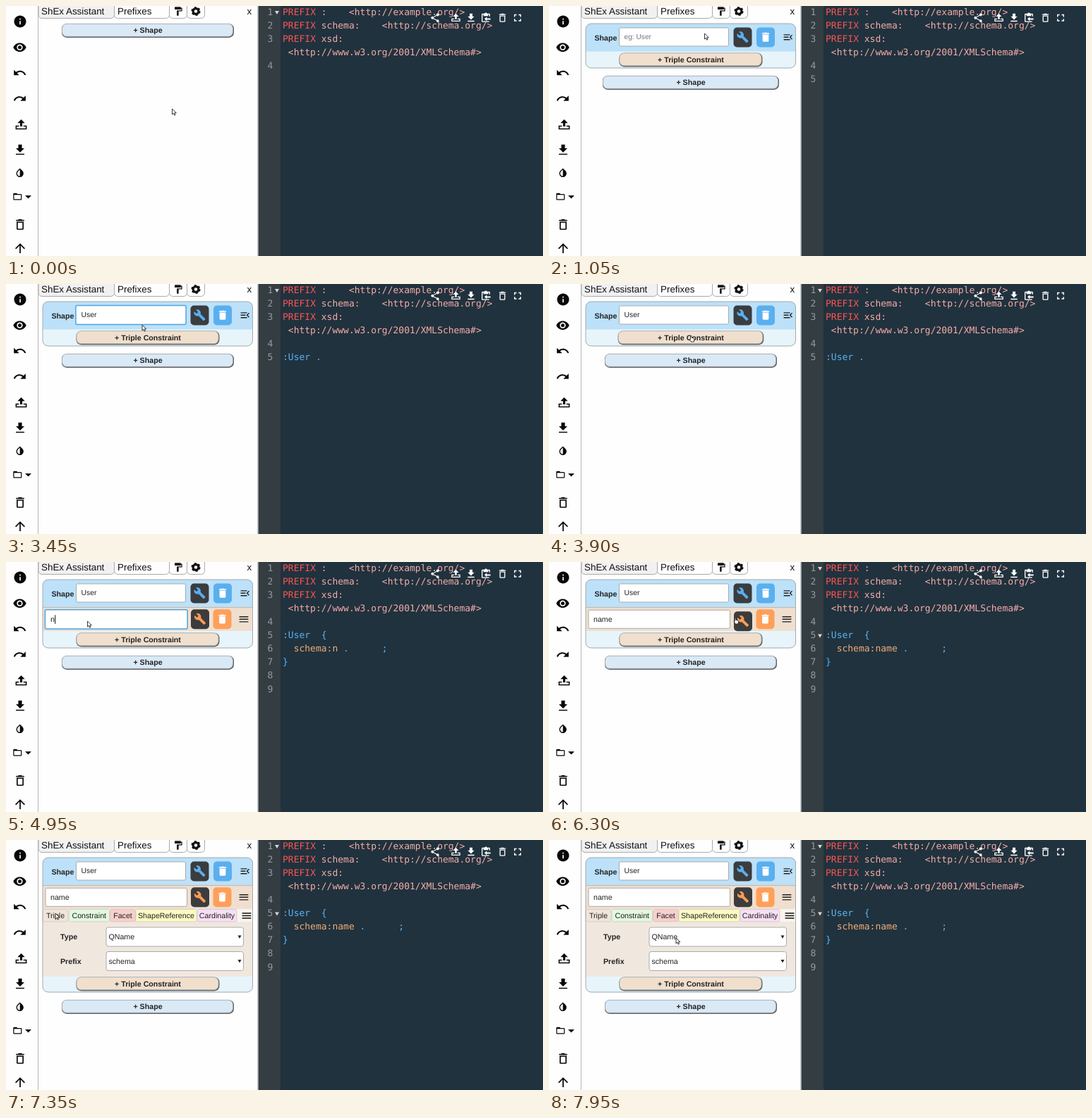
These frames come from a looping animation (761 px wide and 355 px high, 8000 ms). An HTML page:

```html
<!DOCTYPE html>
<html lang="en">
<head>
<meta charset="utf-8">
<title>Shape assistant</title>
<style>
  html, body { margin: 0; width: 100%; height: 100%; overflow: hidden; background: #fefefe; }
  svg { display: block; width: 761px; height: 355px; }
  text { font: 10.67px "Liberation Sans", Arial, sans-serif; fill: #222; text-rendering: geometricPrecision; }
  .b { font-weight: bold; }
  .tab { font-size: 13.4px; fill: #111; }
  .code { font: 13px "DejaVu Sans Mono", monospace; white-space: pre; }
</style>
</head>
<body>
<svg viewBox="0 0 761 355"><g id="back"></g><g id="live"></g></svg>
<script>
const LOOP = 8000, STEP = 150;
const COL = 7.826, ROW = 19.08, BASE = 12.8;
const RED = '#fb5450', PINK = '#f5aca6', BLUE = '#5cb3f0', TAN = '#f0ac78';

const ICONS = {
  info: 'M12 2C6.48 2 2 6.48 2 12s4.48 10 10 10 10-4.48 10-10S17.52 2 12 2zm1 15h-2v-6h2v6zm0-8h-2V7h2v2z',
  eye: 'M12 4.5C7 4.5 2.73 7.6 1 12c1.73 4.4 6 7.5 11 7.5s9.27-3.1 11-7.5c-1.73-4.4-6-7.5-11-7.5zM12 17a5 5 0 1 1 0-10 5 5 0 0 1 0 10zm0-8a3 3 0 1 0 0 6 3 3 0 0 0 0-6z',
  undo: 'M12.5 8c-2.65 0-5.05 1-6.9 2.6L2 7v9h9l-3.62-3.62c1.39-1.16 3.16-1.88 5.12-1.88 3.54 0 6.55 2.31 7.6 5.5l2.37-.78C21.08 11.03 17.15 8 12.5 8z',
  upload: 'M12 2.5L5.5 9H10v6h4V9h4.5zM2 13.5v7h20v-7h-6v2h4v3H4v-3h4v-2z',
  download: 'M19 9h-4V3H9v6H5l7 7 7-7zM5 18v2h14v-2H5z',
  drop: 'M17.66 7.93L12 2.27 6.34 7.93a8 8 0 1 0 11.32 0zM12 19.59a6 6 0 0 1-4.24-10.24L12 5.1z',
  folder: 'M20 6h-8l-2-2H4a2 2 0 0 0-2 2v12a2 2 0 0 0 2 2h16a2 2 0 0 0 2-2V8a2 2 0 0 0-2-2zm0 12H4V8h16z',
  bin: 'M6 19a2 2 0 0 0 2 2h8a2 2 0 0 0 2-2V7H6zM8 9h8v10H8zm7.5-5l-1-1h-5l-1 1H5v2h14V4z',
  trash: 'M6 19a2 2 0 0 0 2 2h8a2 2 0 0 0 2-2V7H6zM19 4h-3.5l-1-1h-5l-1 1H5v2h14z',
  up: 'M4 12l1.41 1.41L11 7.83V20h2V7.83l5.58 5.59L20 12l-8-8z',
  roller: 'M18 4V3a1 1 0 0 0-1-1H5a1 1 0 0 0-1 1v4a1 1 0 0 0 1 1h12a1 1 0 0 0 1-1V6h1v4H9v11a1 1 0 0 0 1 1h2a1 1 0 0 0 1-1v-9h8V4z',
  share: 'M18 16c-.8 0-1.4.3-2 .8l-7.1-4.1v-1.4L16 7.2A3 3 0 1 0 15 5l.1.7L8 9.8a3 3 0 1 0 0 4.4l7.2 4.1A2.9 2.9 0 1 0 18 16z',
  paste: 'M19 3h-4.2a3 3 0 0 0-5.6 0H5a2 2 0 0 0-2 2v14c0 1.1.9 2 2 2h14v-2H5V5h2v3h10V5h2v4h2V5a2 2 0 0 0-2-2zM9 14l5-4v3h8v3h-8v3z',
  full: 'M7 14H5v5h5v-2H7zm-2-4h2V7h3V5H5zm12 7h-3v2h5v-5h-2zM14 5v2h3v3h2V5z',
  wrench: 'M22.7 19l-9.1-9.1c.9-2.3.4-5-1.5-6.9-2-2-5-2.4-7.4-1.3L9 6 6 9 1.6 4.7C.4 7.1.9 10.1 2.9 12.1c1.9 1.9 4.6 2.4 6.9 1.5l9.1 9.1c.4.4 1 .4 1.4 0l2.3-2.3c.5-.4.5-1.1.1-1.4z',
  fold: 'M3 18h13v-2H3zM3 13h10v-2H3zm0-7v2h13V6zm18 9.59L17.42 12 21 8.41 19.59 7l-5 5 5 5z',
  menu: 'M3 18h18v-2H3zm0-5h18v-2H3zm0-7v2h18V6z'
};

const path = (d, fill, extra = '') => `<path d="${d}" fill="${fill}" ${extra}/>`;
const icon = (name, x, y, size, fill = '#111', flip = 1) =>
  path(ICONS[name], fill, `transform="translate(${x} ${y}) scale(${flip * size / 24} ${size / 24}) translate(-12 -12)"`);
const rect = (x, y, w, h, fill, rx = 0, stroke = 'none', sw = 1) =>
  `<rect x="${x}" y="${y}" width="${w}" height="${h}" rx="${rx}" fill="${fill}" stroke="${stroke}" stroke-width="${sw}"/>`;
const text = (x, y, s, cls = '', style = '') => `<text x="${x}" y="${y}" class="${cls}" style="${style}">${s}</text>`;
const code = (row, col, s, fill) =>
  text(392 + col * COL, BASE + row * ROW, s.replace(/</g, '&lt;'), 'code', `fill:${fill}`);

function button(y, x, w, label, fill, grow) {
  const g = 3 * grow;
  return rect(x - g, y - 9.2, w + 2 * g, 19.6, '#5f6264', 7) +
    rect(x - g + .5, y - 9.2, w + 2 * g - 2, 18, fill, 6.5, '#a9adb0', .8) +
    text(201, y + 3.8, label, 'b', 'text-anchor:middle');
}

function field(x, y, w, value, focus, caretX, size = 10.67) {
  const f = focus ? .6 : 0;
  return rect(x - f, y - f, w + 2 * f, 26 + 2 * f, '#fff', 2, focus ? '#4aa4e2' : '#aaa', focus ? 1.5 : 1) +
    text(x + 7, y + 16.3, value, '', `font-size:${size}px`) +
    (caretX ? rect(caretX, y + 7, 1, 12.5, '#111') : '');
}

const square = (x, y, fill, name, ink, grow = 0) =>
  rect(x - grow, y - grow, 26 + 2 * grow, 28 + 2 * grow, fill, 5) + icon(name, x + 13, y + 13.7, 17.5, ink);

const select = (x, y, w, value) =>
  rect(x, y, w, 27, '#fff', 3, '#aaa') + text(x + 3.4, y + 17, value) +
  path(`M${x + w - 8} ${y + 11.5}h5l-2.5 4.5z`, '#222');

function backdrop() {
  const prefix = (row, name) => code(row, 0, 'PREFIX', RED) + code(row, 7, name, PINK);
  const side = [['info', 20, 22, 20.4], ['eye', 19.5, 58.7, 20], ['undo', 19.5, 95, 20], ['undo', 19.5, 131.5, 20, -1],
    ['upload', 21.5, 168.5, 19], ['download', 20, 204.5, 20.5], ['drop', 19.7, 236.7, 15.5], ['folder', 16.3, 270.7, 14.5],
    ['bin', 20, 310.3, 20], ['up', 20, 344, 21]];
  const tools = [['share', 608, 15], ['upload', 637.5, 15], ['download', 659, 16], ['paste', 680, 16],
    ['bin', 703.5, 16], ['full', 725, 17]];
  return rect(0, 0, 761, 355, '#fefefe') + rect(45, 0, 1, 355, '#b5b5b5') +
    side.map(([n, x, y, s, f]) => icon(n, x, y, s, '#080808', f)).join('') +
    path('M27 269h9l-4.5 4.5z', '#111') +
    rect(46, -8, 107.5, 25.5, '#f1f1f1', 5, '#aaa') + rect(153.5, -8, 78, 25.5, '#fefefe', 5, '#aaa') +
    rect(231.5, -8, 25, 25.5, '#fefefe', 5, '#aaa') + rect(256.5, -8, 25, 25.5, '#fefefe', 5, '#aaa') +
    text(50, 12, 'ShEx Assistant', 'tab') + text(158, 12, 'Prefixes', 'tab') + text(341.5, 12, 'x', 'tab') +
    icon('roller', 244, 7.5, 15) +
    '<circle cx="269" cy="7.5" r="3.9" fill="none" stroke="#111" stroke-width="3.2"/>' +
    '<circle cx="269" cy="7.5" r="5.6" fill="none" stroke="#111" stroke-width="2" stroke-dasharray="2.93"/>' +
    rect(356, 0, 1, 355, '#c4c6c8') + rect(357, 0, 1, 355, '#989da0') +
    rect(358, 0, 403, 355, '#20323e') + rect(358, 0, 31, 355, '#343d42') +
    prefix(0, ':') + code(0, 12, '<http://example.org/>', PINK) +
    prefix(1, 'schema:') + code(1, 18, '<http://schema.org/>', PINK) +
    prefix(2, 'xsd:') + code(3, 1, '<http://www.w3.org/2001/XMLSchema#>', PINK) +
    tools.map(([n, x, size]) => icon(n, x, 16.8, size, '#fff')).join('');
}

// Value of the latest entry at or before t.
const at = (t, list) => list.reduce((v, [start, next]) => t >= start ? next : v, list[0][1]);
const between = (t, a, b) => t >= a && t < b;
// Hover growth: rises from a, holds, fades after b.
const hover = (t, a, b) => Math.max(0, Math.min(1, (t - a) / 150, 1 - (t - b) / 300));

const TRAIL = [[150, 235.5, 146], [750, 224, 40], [1050, 220.5, 39], [1950, 220.5, 39], [2250, 57, 58],
  [2850, 57, 58], [3450, 193, 58], [3750, 200, 72], [4050, 198, 74], [4350, 115.5, 84], [5550, 115.5, 84],
  [6150, 262, 79], [6600, 261, 79], [7050, 68, 104], [7350, 70, 104], [7650, 150, 134], [7800, 342, 181],
  [7950, 180, 139]];

function pointer(t) {
  let i = TRAIL.findIndex(p => p[0] > t);
  if (i < 0) i = TRAIL.length;
  const a = TRAIL[Math.max(0, i - 1)], b = TRAIL[Math.min(i, TRAIL.length - 1)];
  const k = b[0] > a[0] ? Math.max(0, (t - a[0]) / (b[0] - a[0])) : 0;
  const e = k * k * (3 - 2 * k);
  const hand = between(t, 750, 1050) || between(t, 3600, 4050) || between(t, 6150, 6750) || between(t, 7050, 7350);
  const d = hand
    ? 'M1.5 4.5V.8q.8-1 1.6 0V3.2l3 .8q.9.4.7 1.6L6.2 9H2.4L.2 5.6q0-1.2 1.3-.2z'
    : 'M0 0V8L1.9 6.3 3.1 9.2 4.5 8.6 3.3 5.8H5.8z';
  return path(d, '#fff', `stroke="#222" stroke-width=".9" transform="translate(${a[1] + (b[1] - a[1]) * e} ${a[2] + (b[2] - a[2]) * e})"`);
}

function tabs(panel) {
  const list = [['Triple', 52, 36, '#f0e5da'], ['Constraint', 89, 57.5, '#e2f8df'], ['Facet', 147.5, 36, '#f7cfcd'],
    ['ShapeReference', 184, 86, '#fafbc2'], ['Cardinality', 271, 56, '#f7dff5']];
  const body = panel === 'triple'
    ? rect(52, 116, 297.5, 78, '#f0e8df') + text(77, 141, 'Type', 'b') + select(142, 124, 194.5, 'QName') +
      text(77, 175.5, 'Prefix', 'b') + select(142, 158.5, 194.5, 'schema')
    : rect(52, 116, 297.5, 36, '#e2f8df') + text(74.5, 138, 'Constraint', 'b') + select(140.5, 120.5, 199, 'None');
  return rect(52, 98, 297.5, 18, '#f9f4ef') + body +
    list.map(([s, x, w, fill]) => rect(x, 98.5, w, 17.5, fill, 2, '#c9c4bf', .7) +
      text(x + w / 2, 111, s, '', 'text-anchor:middle')).join('') +
    icon('menu', 341, 107.5, 17);
}

function builder(t) {
  if (t < 1050) return button(34.5, 79, 244, '+ Shape', '#d9e9f6', hover(t, 600, 1050));
  const triple = t >= 4050;
  const panel = at(t, [[0, ''], [6450, 'constraint'], [7200, 'triple']]);
  const dy = (triple ? 34 : 0) + ({ constraint: 52, triple: 94 }[panel] || 0);
  const user = at(t, [[0, ''], [2100, 'U'], [2250, 'Us'], [2700, 'Use'], [2850, 'User']]);
  const name = at(t, [[0, ''], [4650, 'n'], [5100, 'nam'], [5250, 'name']]);
  const userCaret = between(t, 1800, 3150) && 106.5 + [0, 7.5, 12.7, 18.5, 22][user.length];
  const nameCaret = between(t, 4350, 5700) && 63.2 + [0, 6, 12, 21, 27][name.length];
  const press = between(t, 6300, 6450) ? 3 : 0;

  let out = rect(52, 25, 298, 63.5 + dy, '#e7f5fb', 8) +
    path('M52 64.5V33a8 8 0 0 1 8-8h282a8 8 0 0 1 8 8v31.5z', '#bce1f9') +
    text(64.5, 48.5, 'Shape', 'b') +
    field(99.5, 31, 155, user, between(t, 1350, 3900), userCaret, 10.4) +
    (user ? '' : text(106.5, 47, 'eg: User', '', 'fill:#777;font-size:10.2px')) +
    square(261.5, 30.5, '#3b3c3e', 'wrench', '#5aafee') + square(294, 30.5, '#5aafee', 'trash', '#fff') +
    icon('fold', 338.8, 44.3, 16.5, '#222');
  if (triple) {
    out += rect(52, 64.5, 298, 33.5, '#f0dfcf') + rect(52, 64.3, 298, .8, '#bba99a') +
      field(56, 68.3, 200.5, name, between(t, 4350, 6150), nameCaret) +
      square(262, 67.3 + press, '#3b3c3e', 'wrench', '#fc9c55', between(t, 6450, 6900) ? 1 : 0) +
      square(293.5, 67.3, '#fea05a', 'trash', '#fff') + icon('menu', 337, 81.3, 17, '#222');
  }
  if (panel) out += tabs(panel);
  return out + rect(52, 25, 297.5, 63 + dy, 'none', 8, '#a4a9ac') +
    button(76 + dy, 99.5, 203, '+ Triple Constraint', '#f1dfcd', t < 4500 ? hover(t, 3450, 4050) * .6 : 0) +
    button(108.5 + dy, 79, 244, '+ Shape', '#d9e9f6', t < 1500 ? hover(t, 600, 1050) : 0);
}

function editor(t) {
  const lines = at(t, [[0, 4], [1050, 5], [4950, 9]]);
  const user = at(t, [[0, ''], [2100, 'U'], [2400, 'Us'], [2700, 'Use'], [2850, 'User'], [4050, '']]);
  const name = at(t, [[0, ''], [4950, 'n'], [5100, 'nam'], [5250, 'name']]);
  let out = '';
  for (let i = 1; i <= lines; i++)
    out += text(370.5, BASE + ROW * (i - (i < 4 ? 1 : 0)), i, 'code', 'fill:#939b9f');
  const stale = between(t, 1050, 1500) || between(t, 2100, 3150) || between(t, 4050, 4350) || between(t, 4950, 5700);
  const mark = y => path(`M381 ${y}h6l-3 5z`, '#d5d8da');
  if (!stale) out += mark(7) + (name ? mark(102.5) : '');
  if (user) out += code(5, 0, ':' + user, BLUE) + code(5, user.length + 2, '.', BLUE);
  if (name) {
    const end = 10 + name.length;
    out += code(5, 0, ':User', BLUE) + code(5, 7, '{', BLUE) + code(6, 2, 'schema:' + name, TAN) +
      code(6, end, '.', BLUE) + code(6, end + 7, ';', BLUE) + code(7, 0, '}', BLUE);
  }
  return out;
}

document.getElementById('back').innerHTML = backdrop();
const live = document.getElementById('live');
let shown = -1;

function draw(now) {
  const t = Math.floor(now % LOOP / STEP) * STEP;
  if (t !== shown) {
    live.innerHTML = builder(t) + editor(t) + pointer(t);
    shown = t;
  }
  requestAnimationFrame(draw);
}
draw(0);
</script>
</body>
</html>
```
